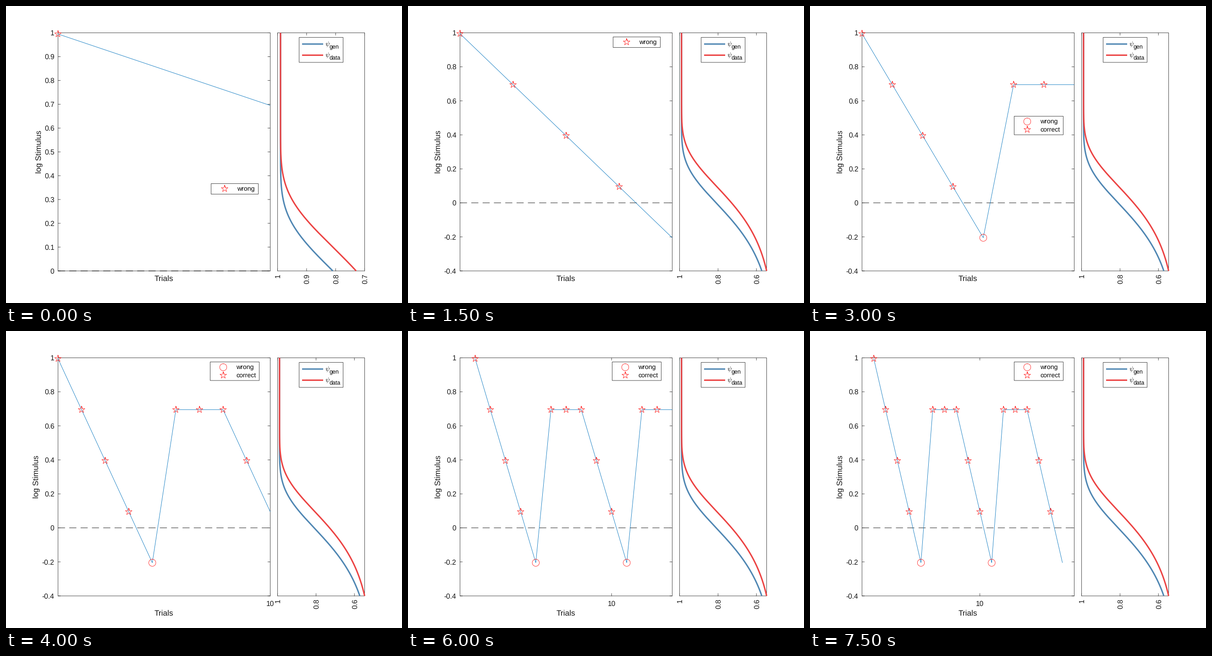
Recreate the animation shown at these times as a matplotlib script. Size 864 by 648 pixels, loop 8000 ms.

```python
import numpy as np
import matplotlib.pyplot as plt
from matplotlib.animation import FuncAnimation
from matplotlib.patches import Rectangle

plt.rcParams["font.family"] = "Liberation Sans"
plt.rcParams["text.hinting"] = "none"
# Keep thin lines at their true sub-pixel positions.
plt.rcParams["path.snap"] = False

W, H = 864, 648
FRAMES, STEP = 16, 500
TOP, BOTTOM = 58.5, 578
LEFT = (113.4, 576.5)
RIGHT = (592.6, 782.5)
INK, TEXT = "#262626", "#141414"
LINE, MARK = "#0072bd", "#ff0000"
GEN, DATA = "#5087b3", "#ec4343"
THIN, TICK = 0.85, 5.2
RADIUS = 7.7

# At 72 dpi one point is one pixel, so everything is laid out in pixels.
fig = plt.figure(figsize=(W / 72, H / 72), dpi=72, facecolor="white")
ax = fig.add_axes([0, 0, 1, 1])


def scale(lo, hi, a, b):
    return lambda v: a + (np.asarray(v) - lo) / (hi - lo) * (b - a)


def label(x, y, s, size=15.5, ha="center", rot=0, color=TEXT, **kw):
    ax.text(x, y, s, fontsize=size, ha=ha, va="baseline", rotation=rot,
            rotation_mode="anchor", color=color, **kw)


def line(xs, ys, color=INK, lw=THIN, **kw):
    ax.plot(xs, ys, color=color, lw=lw, **kw)


def marker(x, y, wrong):
    """Circle for a wrong answer, five-pointed star otherwise."""
    if wrong:
        a, r = np.linspace(0, 2 * np.pi, 73), RADIUS
    else:
        a = np.arange(12) * np.pi / 5
        r = np.where(np.arange(12) % 2, 0.382, 1) * RADIUS
    line(x + r * np.sin(a), y - r * np.cos(a), MARK, 0.75,
         solid_joinstyle="miter", zorder=4)


def frame_box(x0, y0, x1, y1, fill="none", z=2):
    ax.add_patch(Rectangle((x0, y0), x1 - x0, y1 - y0, fc=fill, ec=INK,
                           lw=THIN, zorder=z))


def x_ticks(xs):
    for x in xs:
        line([x, x], [BOTTOM, BOTTOM - TICK])
        line([x, x], [TOP, TOP + TICK])


def level(trial):
    """Staircase: three steps down, reset after each wrong answer."""
    if trial <= 5:
        return 0.995 - 0.3 * (trial - 1)
    return 0.695 - 0.3 * max(0, (trial - 6) % 6 - 2)


def is_wrong(trial):
    return trial % 6 == 5


def x_limits(n):
    if n < 10:
        return 1, n + 1
    return 0, (12, 12, 14, 14, 15, 16, 18)[n - 10]


def psi(x, shift):
    return 0.5 + 0.49 * (1 - np.exp(-10 ** (2 * (x - shift))))


def trial_legend(n):
    top = {1: 387.5, 5: 528.5, 7: 240.5}.get(n, 67.5)
    if n < 5:
        frame_box(447.5, top, 550.5, top + 23, "white", 3)
        marker(477, top + 11.2, False)
        label(504.5, top + 15.5, "wrong", 14.1, "left", color="black", zorder=4)
        return
    frame_box(445.5, top, 552.5, top + 40.5, "white", 3)
    for dy, name in ((11.5, "wrong"), (29.2, "correct")):
        marker(474, top + dy, name == "wrong")
        label(502, top + dy + 4.4, name, 14.1, "left", color="black", zorder=4)


def staircase(n, sy, y_ticks):
    lo, hi = x_limits(n)
    sx = scale(lo, hi, *LEFT)
    frame_box(LEFT[0], TOP, LEFT[1], BOTTOM)
    for v in y_ticks:
        y = sy(v)
        line([LEFT[0], LEFT[0] + TICK], [y, y])
        line([LEFT[1], LEFT[1] - TICK], [y, y])
        label(105.5, y + 5.6, f"{v:g}", ha="right")
    if hi >= 10:
        x_ticks([sx(10)])
        label(sx(10), 599.6, "10")
    label(344.7, 620.8 if hi >= 10 else 599.8, "Trials", 17.2)
    label(70.3 if y_ticks[0] < 0 else 76, 318, "log Stimulus", 17.2, rot=90)

    line(LEFT, [sy(0)] * 2, "black", zorder=2.5, dashes=(15.4 / THIN, 9.3 / THIN),
         dash_capstyle="butt")
    trials = range(1, n + 2)
    line(sx(trials), sy([level(t) for t in trials]), LINE,
         solid_capstyle="butt", zorder=2.6)
    for t in range(1, n + 1):
        marker(sx(t), sy(level(t)), is_wrong(t))
    trial_legend(n)


def psychometric(sy, bottom):
    low = 0.7 if bottom == 0 else float(psi(bottom, 0.1))
    sx = scale(1, low, *RIGHT)
    ticks = (1, 0.9, 0.8, 0.7) if bottom == 0 else (1, 0.8, 0.6)
    frame_box(RIGHT[0], TOP, RIGHT[1], BOTTOM)
    x_ticks([sx(v) for v in ticks])
    for v in ticks:
        label(sx(v) + 5.6, 584, f"{v:g}", ha="right", rot=90)

    s = np.linspace(bottom, 1, 300)
    frame_box(639.6, 68.5, 735.5, 123, "white", 3)
    for shift, color, name, y in ((0, GEN, "gen", 83), (0.1, DATA, "data", 107.3)):
        line(sx(psi(s, shift)), sy(s), color, 3.1, zorder=2.7,
             solid_capstyle="butt")
        line([646, 692], [y, y], color, 3.1, zorder=4, solid_capstyle="butt")
        label(696.5, y + 4, r"$\psi$", 14.5, "left", color="black",
              math_fontfamily="cm", zorder=4)
        label(705, y + 9.3, name, 12.5, "left", color="black", zorder=4)


def draw(k):
    n = k + 1
    ax.clear()
    ax.set(xlim=(0, W), ylim=(H, 0))
    ax.axis("off")
    bottom = 0 if n < 4 else -0.4
    sy = scale(bottom, 1, BOTTOM, TOP)
    steps = range(0, 11) if bottom == 0 else range(-4, 11, 2)
    staircase(n, sy, [i / 10 for i in steps])
    psychometric(sy, bottom)
    return []


anim = FuncAnimation(fig, draw, frames=FRAMES, interval=STEP, repeat=True,
                     repeat_delay=0, init_func=lambda: [])
plt.show()
```
